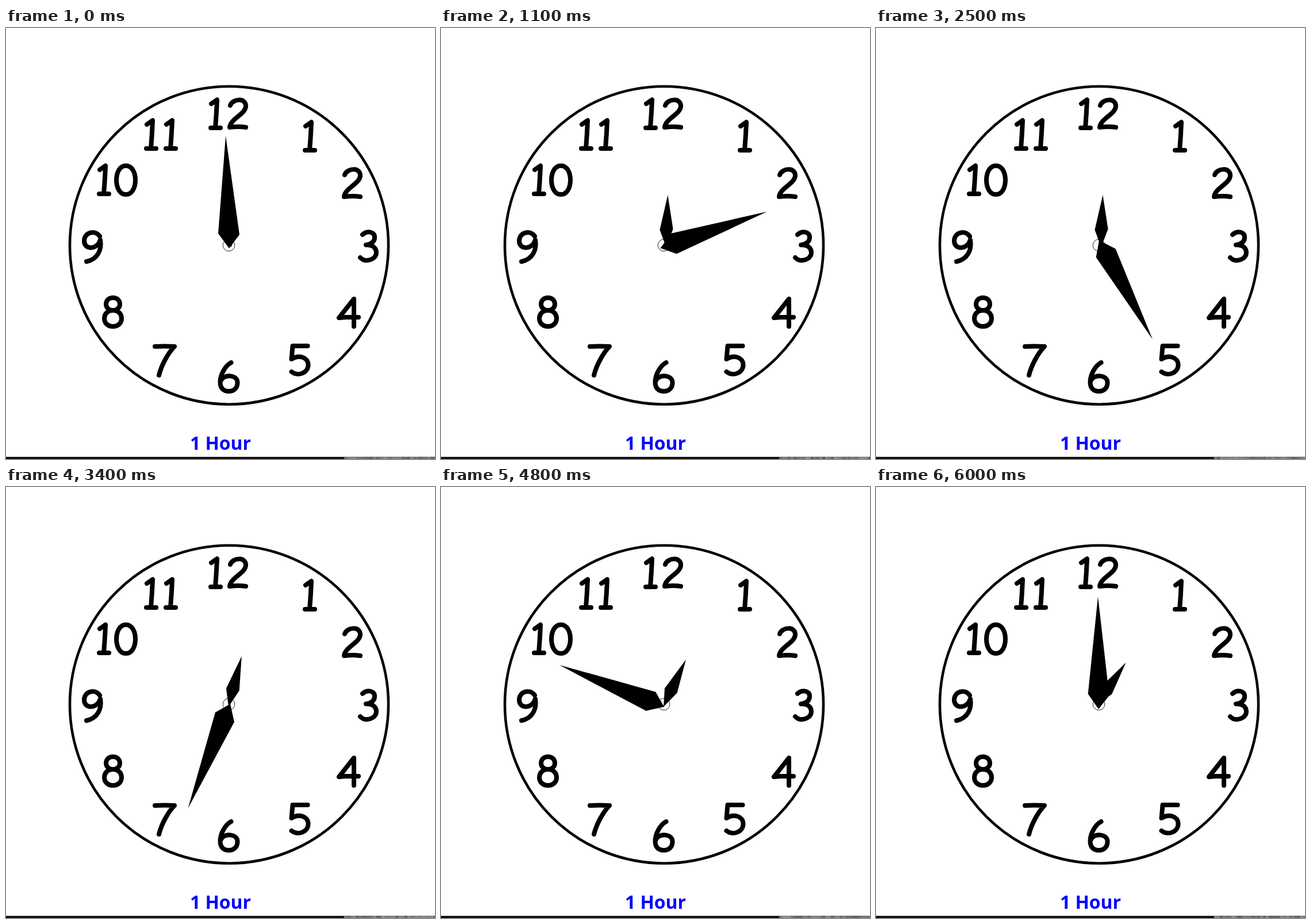
These frames come from a looping animation (746x751 px, 6100 ms). An HTML page:

```html
<!DOCTYPE html>
<html lang="en">
<head>
<meta charset="utf-8">
<title>1 Hour</title>
<style>
  html, body { margin: 0; width: 100%; height: 100%; overflow: hidden; background: #fff; }
  svg { display: block; width: 746px; height: 751px; }
  #digits path { fill: none; stroke: #000; stroke-width: 8; stroke-linecap: round; stroke-linejoin: round; }
  #label { font: 900 40px Impact, "Noto Sans", "Open Sans", sans-serif; font-stretch: extra-condensed; fill: #00f; text-anchor: middle; }
</style>
</head>
<body>
<svg viewBox="0 0 746 751">
  <circle cx="388" cy="378.7" r="277" fill="none" stroke="#000" stroke-width="4.6"/>
  <g id="digits"></g>
  <circle cx="387.5" cy="378.5" r="10.3" fill="none" stroke="#222"/>
  <path id="hour" d="M0 0 L-12 -30 L0 -91 L11 -32 Z"/>
  <path id="minute" d="M0 0 L-18.2 -26.6 L0 -196 L18.7 -23.4 Z"/>
  <text id="label" x="373" y="735">1 Hour</text>
  <rect y="747.3" width="746" height="4" fill="#0c0c0c"/>
  <g id="strip"></g>
</svg>
<script>
const $ = id => document.getElementById(id);
const STEP = 100, STEPS = 61;

// Rounded pen strokes, each digit centred on its own origin.
const glyphs = {
  0: 'M0 -25 C-22 -25 -22 25 0 25 C22 25 22 -25 0 -25Z',
  1: 'M-7 -18 L3 -25 Q2 0 0 24 M-8 24 H9',
  2: 'M-13 -15 C-9 -27 14 -29 14 -14 C14 0 -13 8 -14 23 Q2 21 14 23',
  3: 'M-10 -20 C-2 -27 12 -26 11 -14 C10 -6 3 -3 -4 -2 C8 -3 14 4 14 11 C14 22 2 25 -4 25 Q-9 25 -14 20',
  4: 'M9 24 L9 -24 L-17 9 Q0 7 17 8',
  5: 'M14 -25 H-12 L-14 -2 C-2 -10 15 -6 15 8 C15 22 -3 29 -14 20',
  6: 'M4 -25 C-6 -20 -15 -4 -15 9 C-15 20 -9 25 0 25 C9 25 15 19 15 10 C15 -5 -10 -5 -14 7',
  7: 'M-17 -25 Q0 -26 17 -25 C6 -14 -6 8 -10 25',
  8: 'M0 -25 C16 -25 16 -3 0 -3 C-20 -3 -20 25 0 25 C20 25 20 -3 0 -3 C-16 -3 -16 -25 0 -25Z',
  9: 'M12 -18 C4 -30 -15 -25 -15 -10 C-15 6 8 6 13 -12 C16 6 8 22 -11 26'
};
const numerals = [
  [1, 364, 150], [2, 403, 150], [1, 528, 189], [2, 602, 271], [3, 630, 380],
  [4, 596, 496], [5, 510.5, 579], [6, 387.5, 608], [7, 276, 580], [8, 186, 495],
  [9, 151, 381], [1, 170, 265], [0, 208.5, 265], [1, 252, 186], [1, 286, 186]
];
$('digits').innerHTML = numerals.map(([digit, x, y]) =>
  `<path d="${glyphs[digit]}" transform="translate(${x} ${y})"/>`).join('');

// Keep the label within its line whichever font is available.
const labelWidth = $('label').getComputedTextLength();
$('label').style.fontSize = 40 * Math.min(1, 106 / labelWidth) + 'px';

// minute, pivot x, pivot y, angle
const minuteKeys = [
  [0, 388, 384, -1.75], [6, 381, 393, 42.5], [16, 382, 374, 99.7],
  [25, 388, 370, 151.7], [34, 390, 378, 202], [35, 390, 378, 209],
  [42, 393, 381, 249], [45, 394, 382, 270], [48, 388, 383, 291.8], [60, 387, 387, 359.7]
];
const hourPoses = [
  [0, 391.5, 382, 1.8], [30, 387, 383, 14.5], [40, 387, 383, 25.3], [50, 383, 381, 34.5]
];

function minutePose(minute) {
  const i = Math.max(1, minuteKeys.findIndex(key => key[0] >= minute));
  const from = minuteKeys[i - 1], to = minuteKeys[i];
  const k = (minute - from[0]) / (to[0] - from[0]);
  return from.map((value, j) => value + (to[j] - value) * k);
}

const place = (id, [, x, y, angle]) =>
  $(id).setAttribute('transform', `translate(${x} ${y}) rotate(${angle})`);

function random(seed) {
  const s = Math.sin(seed * 127.1) * 43758.5453;
  return s - Math.floor(s);
}

function drawStrip(minute) {
  let cells = '';
  for (let i = 0; i < 32; i++) {
    const grey = Math.round(95 + 50 * random(minute * 32 + i + 1));
    cells += `<rect x="${588 + i * 5}" y="747.3" width="5" height="4" fill="rgb(${grey},${grey},${grey - 8})"/>`;
  }
  $('strip').innerHTML = cells;
}

let shown = -1;
function draw() {
  const minute = Math.floor(performance.now() / STEP) % STEPS;
  if (minute !== shown) {
    shown = minute;
    place('minute', minutePose(minute));
    place('hour', hourPoses.filter(pose => pose[0] <= minute).pop());
    drawStrip(minute);
  }
  requestAnimationFrame(draw);
}
draw();
</script>
</body>
</html>
```
